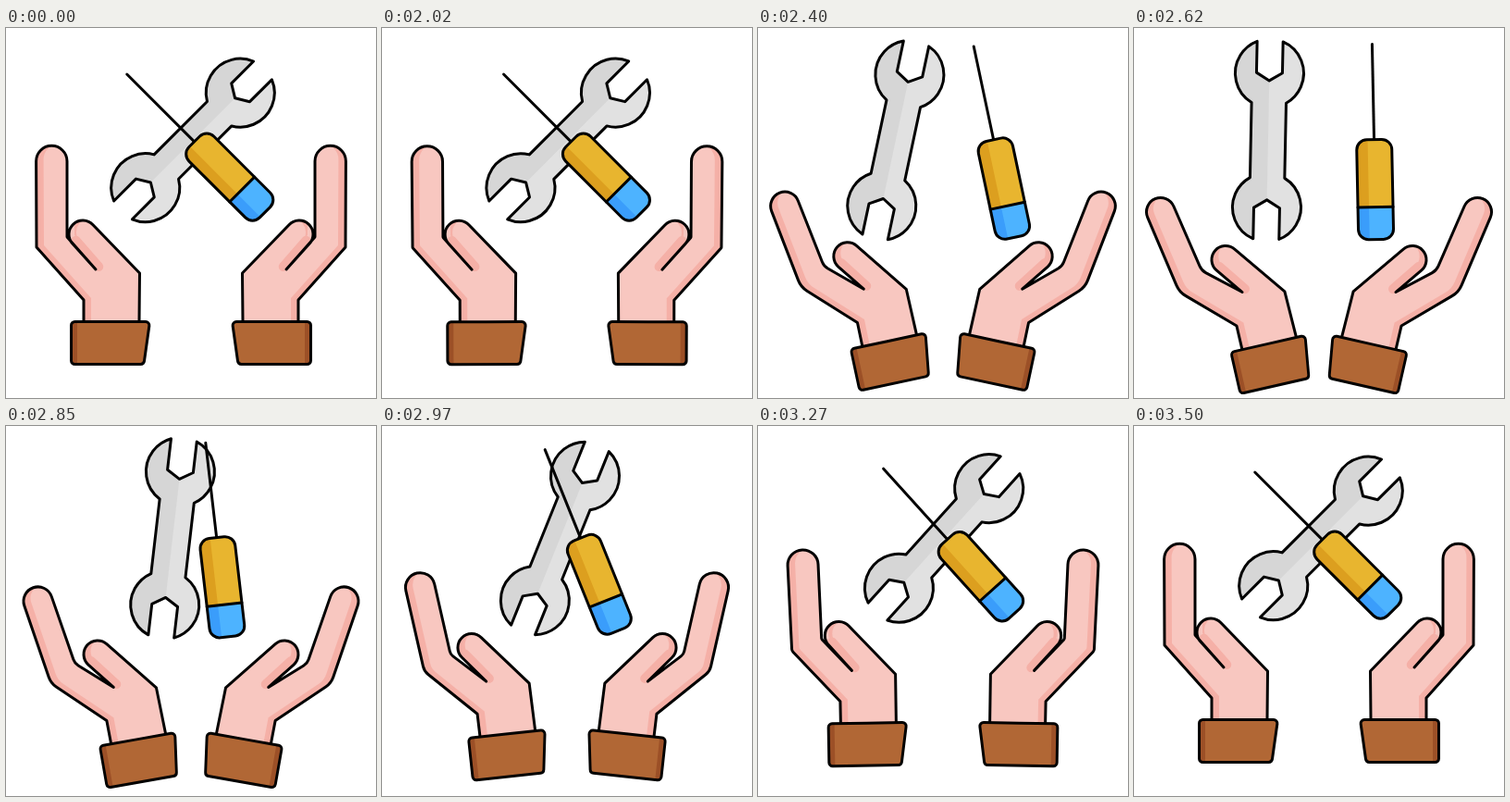
Animation of 400 by 400 pixels, one loop 3520 ms. Source, as an HTML page with a canvas:

```html
<!DOCTYPE html>
<html lang="en">
<head>
<meta charset="utf-8">
<title>Hands and tools</title>
<style>
  html, body { margin: 0; width: 100%; height: 100%; overflow: hidden; background: #fff; }
  canvas { display: block; width: 400px; height: 400px; }
</style>
</head>
<body>
<canvas id="stage" width="400" height="400"></canvas>
<script>
const ctx = document.getElementById('stage').getContext('2d');
const LOOP = 3520, REST = 2000, STEP = 25;
const RAD = Math.PI / 180;

// Each track is 0 at rest and 1 when fully open.
const KEYS = [0, 9, 20, 25, 34, 44, 60];
const TRACKS = {
  slide: [0, 0.545, 1, 0.975, 0.375, 0.048, 0],
  turn: [0, 0.07, 1, 0.974, 0.853, 0.18, 0],
  shift: [0, 0.4, 1, 0.985, 0.88, 0.38, 0],
  bend: [0, 0.62, 1, 0.985, 0.82, 0.37, 0],
  palm: [0, 0.45, 1, 0.985, 0.8, 0.22, 0],
  cuff: [0, 0.62, 1, 0.985, 0.77, 0.21, 0]
};

// Monotone cubic interpolation through the keys.
function sample(values, x) {
  const last = KEYS.length - 1;
  if (x <= 0 || x >= KEYS[last]) return 0;
  const slope = i => (values[i + 1] - values[i]) / (KEYS[i + 1] - KEYS[i]);
  const tangent = i => {
    if (i === 0 || i === last) return 0;
    const a = slope(i - 1), b = slope(i);
    return a * b > 0 ? 2 * a * b / (a + b) : 0;
  };
  let i = 0;
  while (x > KEYS[i + 1]) i++;
  const w = KEYS[i + 1] - KEYS[i], s = (x - KEYS[i]) / w, r = 1 - s;
  return values[i] * (1 + 2 * s) * r * r + tangent(i) * w * s * r * r
    + values[i + 1] * s * s * (3 - 2 * s) - tangent(i + 1) * w * s * s * r;
}

const mix = (a, b, k) => a + (b - a) * k;
const mixPoint = (a, b, k) => [mix(a[0], b[0], k), mix(a[1], b[1], k)];

function placed(x, y, angle, draw) {
  ctx.save();
  ctx.translate(x, y);
  ctx.rotate(angle * RAD);
  draw();
  ctx.restore();
}

// Fills a shape, paints its inner shading, then outlines it.
function paint(shape, color, shade) {
  ctx.fillStyle = color;
  ctx.fill(shape);
  ctx.save();
  ctx.clip(shape);
  shade();
  ctx.restore();
  ctx.stroke(shape);
}

function band(color, x, y, w, h) {
  ctx.fillStyle = color;
  ctx.fillRect(x, y, w, h);
}

function line(x1, y1, x2, y2) {
  ctx.beginPath();
  ctx.moveTo(x1, y1);
  ctx.lineTo(x2, y2);
  ctx.stroke();
}

const wrench = (() => {
  const p = new Path2D();
  const half = Math.asin(18.7 / 37), jaw = Math.asin(14 / 37), q = Math.PI / 2;
  p.moveTo(-14, -73);
  p.lineTo(0, -64.5);
  p.lineTo(14, -73);
  p.arc(0, -72.5, 37, -q + jaw, q - half);
  p.arc(0, 72.5, 37, -q + half, q - jaw);
  p.lineTo(14, 73);
  p.lineTo(0, 64.5);
  p.lineTo(-14, 73);
  p.arc(0, 72.5, 37, q + jaw, 3 * q - half);
  p.arc(0, -72.5, 37, q + half, 3 * q - jaw);
  p.closePath();
  return p;
})();

const grip = new Path2D();
grip.roundRect(-19, -2, 38, 108, 11);

const cuffShape = (() => {
  const p = new Path2D();
  p.moveTo(0, -22.5);
  p.arcTo(43.5, -22.5, 37, 23.5, 4);
  p.arcTo(37, 23.5, -41.5, 23.5, 4);
  p.arcTo(-41.5, 23.5, -41.5, -22.5, 4);
  p.arcTo(-41.5, -22.5, 0, -22.5, 4);
  p.closePath();
  return p;
})();

// Hand outline and thumb crease, relative to the middle of the cuff.
function handParts(k) {
  const at = (a, b) => {
    const [x, y] = mixPoint(a, b, k);
    return [x - 112, y - 340];
  };
  const heel = at([33, 237], [30.5, 243]);
  const wrist = at([84, 294], [83.5, 291.5]);
  const tip = at([49.3, 144], [28.5, 154]);
  const inner = at([66, 226], [58.8, 225]);
  const crease = at([97, 261], [97, 257]);
  const thumb = at([83, 223], [86.7, 219]);
  const knuckle = at([144.5, 265], [142, 266]);
  const lean = 11.4 * RAD * k, slant = mix(47, 53, k) * RAD;
  const r = mix(16.7, 15.3, k);
  const p = new Path2D();
  p.moveTo(-28, 0);
  p.lineTo(-28, -23);
  p.lineTo(...wrist);
  p.arcTo(...heel, tip[0] - r * Math.cos(lean), tip[1] + r * Math.sin(lean), 1 + 24 * k);
  p.arc(...tip, r, Math.PI - lean, 2 * Math.PI - lean);
  p.arcTo(...inner, ...crease, 1 + 14 * k);
  p.lineTo(...crease);
  p.arc(...thumb, 15, slant + Math.PI / 2, slant + Math.PI * 1.5);
  p.lineTo(...knuckle);
  p.lineTo(32, -23);
  p.lineTo(32, 0);
  p.closePath();

  const nx = -Math.sin(slant), ny = Math.cos(slant);
  const fold = [thumb[0] + 10 * nx, thumb[1] + 10 * ny, crease[0] - 4.5 * nx, crease[1] - 4.5 * ny];
  return { shape: p, fold };
}

function drawHand(v) {
  const x = 112 + 37.5 * v.shift, y = 340 + 23.9 * v.shift;
  placed(x, y, -12.2 * v.palm, () => {
    const { shape, fold } = handParts(v.bend);
    paint(shape, '#f5b0a7', () => {
      ctx.translate(8, -2);
      ctx.fillStyle = '#f8c7c0';
      ctx.fill(shape);
      ctx.translate(-8, 2);
      ctx.strokeStyle = '#f5b0a7';
      ctx.lineWidth = 10;
      line(...fold);
    });
  });
  placed(x, y, -13 * v.cuff, () => {
    ctx.scale(1 - 0.033 * v.shift, 1);
    paint(cuffShape, '#b16735', () => band('#9c5027', -42, -24, 7, 50));
  });
}

function drawWrench(v) {
  placed(202 - 58.5 * v.slide, 121.4, 45 * (1 - v.turn), () => {
    paint(wrench, '#e1e1e1', () => band('#d6d6d6', -40, -115, 40, 230));
  });
}

// The driver pivots slightly below its middle.
function drawDriver(v) {
  placed(209.1 + 51.9 * v.slide, 128.4, -45 * (1 - v.turn), () => {
    ctx.translate(0, -5.8);
    line(0, -105, 0, -2);
    paint(grip, '#e8b52f', () => {
      band('#dc9f1f', -19, -2, 12, 108);
      band('#4db3ff', -19, 71, 38, 36);
      band('#3a9dfb', -19, 71, 12, 36);
    });
    line(-19, 71, 19, 71);
  });
}

function render(time) {
  const step = Math.floor((time % LOOP - REST + 5) / STEP);
  const v = {};
  for (const name in TRACKS) v[name] = sample(TRACKS[name], step);
  ctx.fillStyle = '#fff';
  ctx.fillRect(0, 0, 400, 400);
  ctx.strokeStyle = '#000';
  ctx.lineWidth = 3;
  ctx.lineJoin = ctx.lineCap = 'round';
  drawHand(v);
  ctx.save();
  ctx.translate(400, 0);
  ctx.scale(-1, 1);
  drawHand(v);
  ctx.restore();
  drawWrench(v);
  drawDriver(v);
}

let start;
function tick(now) {
  start ??= now;
  render(now - start);
  requestAnimationFrame(tick);
}
render(0);
requestAnimationFrame(tick);
</script>
</body>
</html>
```
